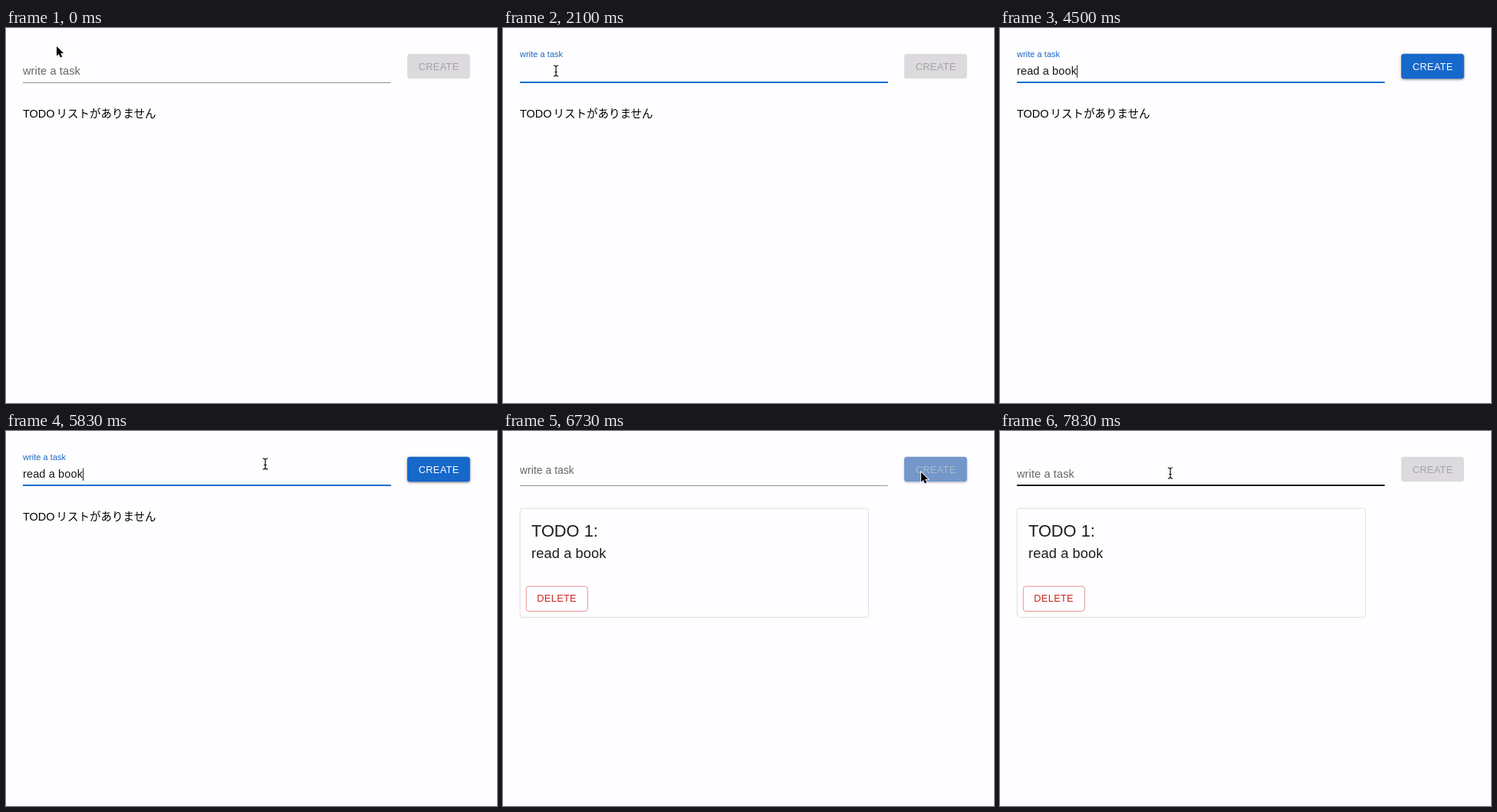
These frames come from a looping animation (640 px wide and 490 px high, 8000 ms). An HTML page:

```html
<!DOCTYPE html>
<html lang="ja">
<head>
<meta charset="utf-8">
<title>Todo list</title>
<style>
  html, body { margin: 0; width: 100%; height: 100%; overflow: hidden; background: #fefdff; }
  svg { display: block; font-family: "Liberation Sans", Arial, sans-serif; }
  .body { font-size: 14.5px; letter-spacing: .00938em; white-space: pre; }
  .jp { font-family: "Noto Sans CJK JP", "Noto Sans CJK", sans-serif; }
  .button { font-size: 12.73px; letter-spacing: .02857em; }
</style>
</head>
<body>
<svg width="640" height="490" viewBox="0 0 640 490">
  <text id="label" class="body" x="0" y="0">write a task</text>
  <text id="value" class="body" x="22" y="61" fill="#161616"></text>
  <rect id="caret" y="48.5" width="1" height="16.5" fill="#222"/>
  <rect id="line" x="22" width="479.5"/>
  <rect id="focus" y="70" height="2" fill="#126fd3"/>

  <g id="shadow">
    <rect x="523" y="35" width="81.8" height="32.6" rx="3.6" fill-opacity=".3" style="filter:blur(.8px)"/>
    <rect x="523" y="34.5" width="81.8" height="32.6" rx="3.6" fill-opacity=".2" style="filter:blur(2px)"/>
  </g>
  <rect id="create" x="523" y="33.7" width="81.8" height="32.6" rx="3.6"/>
  <text id="createText" class="button" x="537.7" y="54.5">CREATE</text>

  <g id="empty">
    <text x="22" y="117" font-size="14.5">TODO</text>
    <text class="jp" x="65.5" y="117" font-size="14.5">リストがありません</text>
  </g>

  <g id="card" fill="#1c1b1d">
    <rect x="22.2" y="101" width="454.3" height="142.5" rx="3.6" fill="none" stroke="#dedde0"/>
    <text x="37" y="138" font-size="21.8">TODO 1:</text>
    <text x="37" y="165.5" font-size="18.2" letter-spacing=".136">read a book</text>
    <rect x="30.3" y="203" width="80" height="32.5" rx="3.6" fill="none" stroke="#e39492"/>
    <text class="button" x="44.3" y="223.3" fill="#c8251f">DELETE</text>
  </g>

  <path id="arrow" d="M0 0V12.6L2.9 9.9 4.9 14.5 7.2 13.5 5.2 9H9.2Z"
        stroke="#fff" stroke-width="1.6" paint-order="stroke"/>
  <path id="beam" d="M-3.2 -7Q0 -7 0 -5Q0 -7 3.2 -7M0 -5V5M-3.2 7Q0 7 0 5Q0 7 3.2 7M-1.7 1.5H1.7"
        fill="none" stroke="#111" stroke-width="1.2"/>
</svg>
<script>
const LOOP = 8000;
const HOVER = 230, FOCUS = 580, TYPE = 2640, TYPED = 4400, BLUR = 6535, CLICK = 6645;
const TASK = "read a book";
const GREY = [220, 218, 221], BLUE = [22, 104, 203], DARK = [18, 88, 184];

// time, x, y of the pointer's hot spot
const MOVES = [
  [[30, 66, 24], [230, 68, 42], [400, 69, 56]],
  [[5560, 69, 56], [5830, 337, 43], [5900, 400, 40], [6050, 500, 28], [6250, 545, 54]],
  [[7300, 545, 54], [7480, 440, 47], [7830, 222, 55]]
];

const el = {};
document.querySelectorAll("[id]").forEach(e => el[e.id] = e);
const set = (e, attrs) => { for (const k in attrs) e.setAttribute(k, attrs[k]); };
const show = (e, on) => e.style.display = on ? "" : "none";
const clamp = v => Math.min(1, Math.max(0, v));
const mix = (a, b, p) => a.map((v, i) => v + (b[i] - v) * p);
const rgb = c => `rgb(${c.map(Math.round)})`;

// CSS cubic-bezier with x1, y1 = a, 0 and x2, y2 = .2, 1
function ease(x, a) {
  let lo = 0, hi = 1;
  for (let i = 0; i < 24; i++) {
    const s = (lo + hi) / 2, r = 1 - s;
    if (3 * r * r * s * a + .6 * r * s * s + s ** 3 < x) lo = s; else hi = s;
  }
  return lo * lo * (3 - 2 * lo);
}
const out = (t, start) => t >= start + 200 ? 1 : ease(clamp((t - start) / 200), 0);
const inOut = (t, start) => t >= start + 250 ? 1 : ease(clamp((t - start) / 250), .4);

function slope(keys, i, k) {
  const a = keys[i - 1], b = keys[i + 1];
  return a && b ? (b[k] - a[k]) / (b[0] - a[0]) : 0;
}

function pointer(t) {
  let keys = MOVES[0];
  for (const m of MOVES) if (t >= m[0][0]) keys = m;
  const last = keys[keys.length - 1];
  if (t <= keys[0][0]) return keys[0].slice(1);
  if (t >= last[0]) return last.slice(1);
  const i = keys.findIndex(k => k[0] > t) - 1, a = keys[i], b = keys[i + 1];
  const d = b[0] - a[0], u = (t - a[0]) / d, v = 1 - u;
  return [1, 2].map(k =>
    a[k] * (1 + 2 * u) * v * v + b[k] * u * u * (3 - 2 * u) +
    d * u * v * (slope(keys, i, k) * v - slope(keys, i + 1, k) * u));
}

function typedCount(t) {
  if (t < TYPE) return 0;
  if (t < 2780) return 1;
  return Math.min(TASK.length, 2 + Math.floor((t - 2780) * 9 / (TYPED - 2780)));
}

function drawField(t, hover) {
  const count = t < CLICK ? typedCount(t) : 0;
  el.value.textContent = TASK.slice(0, count);

  const focused = t >= FOCUS && t < BLUR;
  const sinceKey = t < TYPE ? t - FOCUS - 20 : t - TYPED;
  const typing = t >= TYPE && t < TYPED;
  show(el.caret, focused && (typing || sinceKey % 1000 < 500));
  set(el.caret, { x: 22 + (count ? el.value.getComputedTextLength() : 0) });

  const lift = out(t, FOCUS) - out(t, CLICK);
  const tint = out(t, FOCUS) - out(t, BLUR);
  set(el.label, {
    transform: `translate(22 ${61 - 23 * lift}) scale(${1 - .25 * lift})`,
    fill: rgb(mix([102, 101, 103], [25, 103, 190], tint))
  });

  set(el.line, hover
    ? { y: 70, height: 2, fill: "#18171a" }
    : { y: 71, height: 1, fill: "#939295" });
  const width = 479.5 * tint;
  set(el.focus, { x: 261.75 - width / 2, width });
}

function drawButton(t) {
  const p = inOut(t, TYPE + 10) - inOut(t, CLICK);
  const alpha = .26 + .74 * p, level = 255 * p / alpha;
  set(el.create, { fill: rgb(mix(GREY, mix(BLUE, DARK, inOut(t, 6190)), p)) });
  set(el.createText, { fill: rgb([level, level, level]), "fill-opacity": alpha });
  set(el.shadow, { opacity: p });
}

function draw() {
  const t = performance.now() % LOOP;
  const [x, y] = pointer(t);
  const hidden = t >= TYPE && t < 5560;
  const inside = t >= HOVER && x > 22 && x < 502 && y > 38;
  drawField(t, inside && !hidden);
  drawButton(t);
  show(el.empty, t < CLICK);
  show(el.card, t >= CLICK);
  show(el.arrow, !hidden && !inside);
  show(el.beam, !hidden && inside);
  set(inside ? el.beam : el.arrow, { transform: `translate(${x} ${y})` });
  requestAnimationFrame(draw);
}
draw();
</script>
</body>
</html>
```
